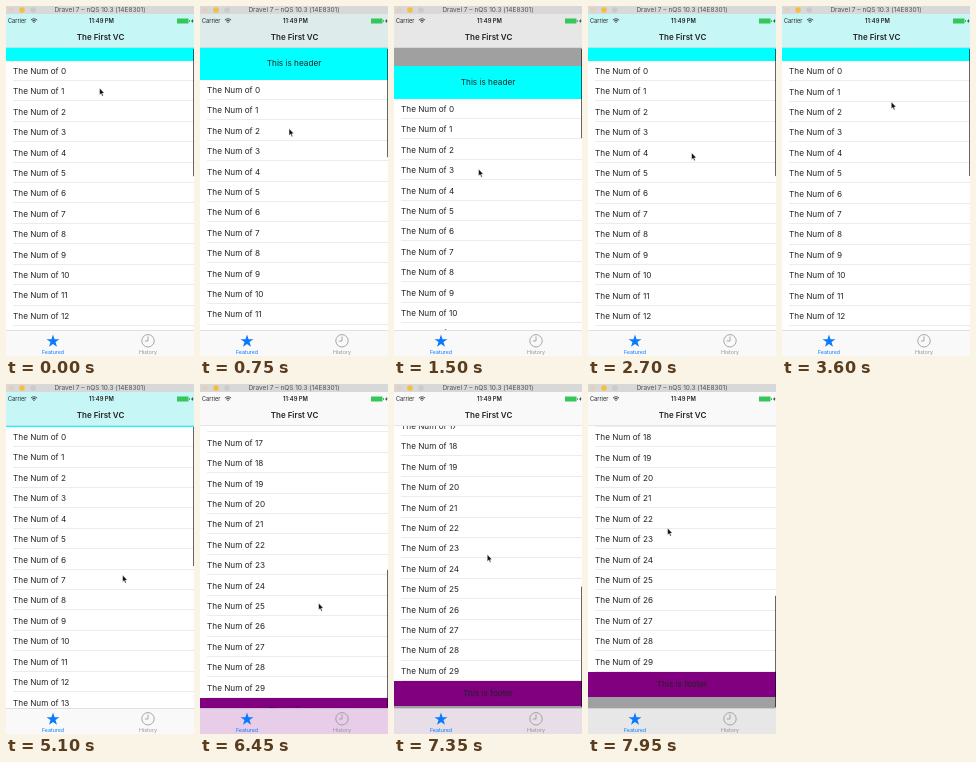
An HTML page with a canvas that plays this animation: 188 by 350 pixels, repeating every 8 s.

```html
<!DOCTYPE html>
<html lang="en">
<head>
<meta charset="utf-8">
<style>
  html, body { margin: 0; width: 100%; height: 100%; overflow: hidden; background: #fff; }
  canvas { display: block; width: 188px; height: 350px; }
</style>
</head>
<body>
<canvas id="stage"></canvas>
<script>
const W = 188, H = 350, MID = 94, LOOP = 8000, STEP = 150;
const NAV_TOP = 8, TOP = 42, BOTTOM = 324;
const ROW = 20.42, ROWS = 30, HEADER = 33, FOOTER = 25;
const REST_TOP = 42.7, REST_BOTTOM = -297, THUMB = 139;
const WHITE = [255, 255, 255], CYAN = [50, 242, 240], GRAY = [182, 182, 182], PURPLE = [188, 80, 188];

const canvas = document.getElementById('stage');
const ratio = window.devicePixelRatio || 1;
canvas.width = W * ratio;
canvas.height = H * ratio;
const ctx = canvas.getContext('2d');
ctx.scale(ratio, ratio);

// Smooth step from 0 to 1 while v goes from a to b
function ramp(v, a, b) {
  const p = Math.min(1, Math.max(0, (v - a) / (b - a)));
  return p * p * (3 - 2 * p);
}

const mix = (a, b, f) => a.map((v, i) => v + (b[i] - v) * f);
const glass = tint => `rgb(${mix(tint, [247, 247, 247], 0.75).map(Math.round).join()})`;

// Each gesture moves both the list and the pointer
function pose(t) {
  const pull = ramp(t, 0, 1500), release = ramp(t, 2400, 2840), travel = ramp(t, 2550, 3105);
  const pullAgain = ramp(t, 3300, 4200), releaseAgain = ramp(t, 4500, 5100);
  const flick = ramp(t, 5100, 6450), overscroll = ramp(t, 6450, 7950);
  return {
    first: 54.5 + 38 * pull - 49.8 * release + 46.5 * (pullAgain - releaseAgain)
      - 341.5 * flick - 26 * overscroll,
    x: 95 - 9 * pull + 25 * release - pullAgain + 8 * releaseAgain + 2 * flick - 39 * overscroll,
    y: 86 + 81 * pull - 91 * travel + 92 * pullAgain + 27 * releaseAgain + 28 * flick - 75 * overscroll
  };
}

function rect(x, y, w, h, color) {
  ctx.fillStyle = color;
  ctx.fillRect(x, y, w, h);
}

function text(str, x, y, size, { color = '#222', align = 'center', weight = 400 } = {}) {
  ctx.font = `${weight} ${size}px Inter, sans-serif`;
  ctx.textAlign = align;
  ctx.fillStyle = color;
  ctx.fillText(str, x, y + size * 0.36);
}

function disc(x, y, r, color) {
  ctx.beginPath();
  ctx.arc(x, y, r, 0, 7);
  ctx.fillStyle = color;
  ctx.fill();
}

function shape(points, color) {
  ctx.beginPath();
  points.forEach(([x, y]) => ctx.lineTo(x, y));
  ctx.closePath();
  ctx.fillStyle = color;
  ctx.fill();
}

function drawTable(first) {
  const top = Math.round(first), end = Math.round(first + ROWS * ROW);
  rect(0, NAV_TOP, W, H, '#a0a0a0');
  rect(0, top - HEADER, W, HEADER, '#0ff');
  text('This is header', MID, first - HEADER / 2, 8.2);
  rect(0, top, W, end - top, '#fff');
  for (let i = 0; i < ROWS; i++) {
    const y = first + i * ROW;
    if (y < -ROW || y > H) continue;
    text('The Num of ' + i, 7, y + 10.4, 8.2, { align: 'left' });
    rect(7, Math.round(y + ROW) - 1, W - 7, 1, '#ececee');
  }
  rect(0, end, W, FOOTER, '#800080');
  text('This is footer', MID, end + 12, 8.2);
}

function drawThumb(first) {
  const over = Math.max(0, first - REST_TOP, REST_BOTTOM - first);
  const size = THUMB - over;
  const f = Math.min(1, Math.max(0, (REST_TOP - first) / (REST_TOP - REST_BOTTOM)));
  rect(W - 1, TOP + 1 + (BOTTOM - TOP - 2 - size) * f, 1, size, 'rgba(0,0,0,.6)');
}

function drawStatus() {
  text('Carrier', 2, 15, 5.6, { align: 'left' });
  ctx.strokeStyle = '#222';
  ctx.lineWidth = 0.8;
  for (const r of [1.2, 2.8, 4.4]) {
    ctx.beginPath();
    ctx.arc(28, 17.2, r, -Math.PI * 0.75, -Math.PI * 0.25);
    ctx.stroke();
  }
  text('11:49 PM', 95.5, 15, 5.8, { weight: 600 });
  rect(171, 12.5, 11.5, 5, '#35c759');
  rect(183, 14, 1, 2, '#35c759');
  shape([[187, 12.5], [185, 15.4], [186.3, 15.4], [185.8, 17.6], [187.6, 14.6], [186.4, 14.6]], '#222');
}

function drawNav(first) {
  const scrolled = mix(WHITE, CYAN, ramp(first, 10, 30));
  rect(0, NAV_TOP, W, TOP - NAV_TOP, glass(mix(scrolled, GRAY, ramp(first, 57, 82))));
  rect(0, TOP - 0.5, W, 0.5, 'rgba(0,0,0,.15)');
  text('The First VC', 94.5, 31, 8, { weight: 600 });
  drawStatus();

  rect(0, 0, W, NAV_TOP, '#d8d8d8');
  ['#e2cfc0', '#f6be3f', '#cacaca'].forEach((c, i) => disc(5 + i * 11, 4, 2.8, c));
  text('Dravel 7 – nQS 10.3 (14E8301)', MID, 4, 6.5, { color: '#555' });
}

function drawTabs(first) {
  const end = first + ROWS * ROW;
  const below = mix(GRAY, PURPLE, ramp(end, 290, 308));
  rect(0, BOTTOM, W, H - BOTTOM, glass(mix(below, WHITE, ramp(end, 325, 345))));
  rect(0, BOTTOM, W, 0.5, 'rgba(0,0,0,.2)');

  const star = Array.from({ length: 10 }, (_, i) => {
    const r = i % 2 ? 2.6 : 6.8, a = i * Math.PI / 5;
    return [47 + r * Math.sin(a), 335.3 - r * Math.cos(a)];
  });
  shape(star, '#087aff');
  text('Featured', 47, 346, 5.3, { color: '#087aff' });

  ctx.strokeStyle = '#929292';
  ctx.lineWidth = 0.8;
  ctx.beginPath();
  ctx.arc(142, 334.8, 6.2, 0, 7);
  ctx.moveTo(142, 330.5);
  ctx.lineTo(142, 335);
  ctx.lineTo(138.8, 335);
  ctx.stroke();
  text('History', 142, 346, 5.3, { color: '#929292' });
}

function drawPointer(x, y) {
  ctx.save();
  ctx.translate(x - 1.5, y - 4);
  shape([[0, 0], [0, 7], [1.6, 5.6], [2.7, 8.2], [3.8, 7.7], [2.8, 5.3], [4.8, 5]], '#111');
  ctx.strokeStyle = '#fff';
  ctx.lineWidth = 0.5;
  ctx.stroke();
  ctx.restore();
}

function frame() {
  const time = performance.now() % LOOP;
  const { first, x, y } = pose(Math.floor(time / STEP) * STEP);
  drawTable(first);
  drawThumb(first);
  drawNav(first);
  drawTabs(first);
  drawPointer(x, y);
  requestAnimationFrame(frame);
}
frame();
</script>
</body>
</html>
```
